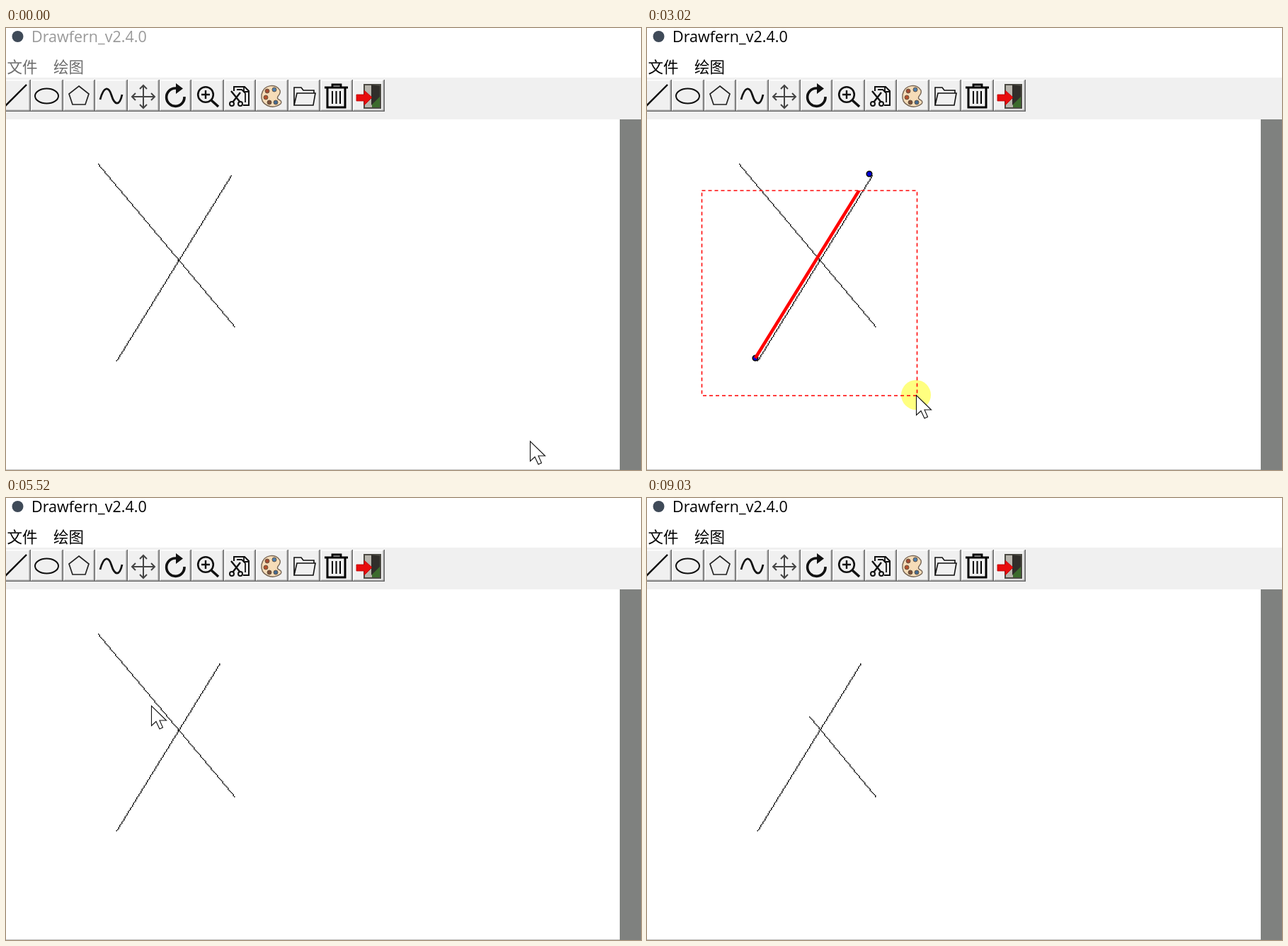
An HTML page with a canvas that plays this animation: 897 px wide and 624 px high, repeating every 9.3 s.

```html
<!DOCTYPE html>
<html lang="zh">
<head>
<meta charset="utf-8">
<title>Drawfern</title>
<style>
html, body { margin: 0; width: 100%; height: 100%; overflow: hidden; background: #fff; }
canvas { display: block; }
</style>
</head>
<body>
<canvas id="stage" width="897" height="624"></canvas>
<script>
const ctx = document.getElementById('stage').getContext('2d');
const LOOP = 9300, STEP = 125.5, TAU = Math.PI * 2;

// Pointer keys: step, x, y
const path = [
  [0, 740, 583], [1, 640, 460], [2, 510, 300], [3, 400, 170], [4, 347, 106],
  [5, 335, 100], [6, 328, 97], [7, 322, 110], [11, 267, 281], [13, 267, 281],
  [14, 245, 272], [17, 76, 228], [18, 120, 270], [22, 389, 500], [23, 390, 519],
  [24, 380, 518], [25, 385, 480], [29, 470, 230], [31, 515, 165], [32, 529, 162],
  [33, 545, 221], [34, 520, 330], [36, 471, 484], [37, 471, 484], [38, 398, 519],
  [39, 398, 524], [40, 392, 522], [44, 205, 293], [46, 205, 277], [47, 205, 277],
  [48, 207, 277], [50, 207, 277], [56, 226, 170], [57, 225, 160], [58, 115, 329],
  [59, 74, 370], [60, 85, 382], [61, 150, 380], [65, 400, 500], [66, 415, 505],
  [69, 441, 476], [71, 749, 587]
];

// Each selected line: ends of its handles, drag corner, and step ranges
const picks = [
  { a: [153, 466], b: [314, 206], corner: [77.5, 229.5], from: 13, drag: 18, end: 40 },
  { a: [126, 189], b: [319, 419], corner: [226.5, 161.5], from: 50, drag: 58, end: 66 }
];

const within = (k, a, b) => k >= a && k < b;
const isDown = k => within(k, 5, 7) || k === 13 || within(k, 17, 40) || k === 50 || within(k, 58, 66);

function pointer(k) {
  const i = path.findIndex(p => p[0] >= k);
  if (i < 0) return null;
  const [k1, x1, y1] = path[i];
  if (!i) return [x1, y1];
  const [k0, x0, y0] = path[i - 1];
  const f = (k - k0) / (k1 - k0);
  return [Math.round(x0 + (x1 - x0) * f), Math.round(y0 + (y1 - y0) * f)];
}

function box(x, y, w, h, color) {
  ctx.fillStyle = color;
  ctx.fillRect(x, y, w, h);
}

function shape(d, stroke, width = 2, fill) {
  const p = new Path2D(d);
  if (fill) { ctx.fillStyle = fill; ctx.fill(p); }
  if (stroke) { ctx.strokeStyle = stroke; ctx.lineWidth = width; ctx.stroke(p); }
}

function disc(x, y, r, fill, stroke, width = 1) {
  ctx.beginPath();
  ctx.arc(x, y, r, 0, TAU);
  if (fill) { ctx.fillStyle = fill; ctx.fill(); }
  if (stroke) { ctx.strokeStyle = stroke; ctx.lineWidth = width; ctx.stroke(); }
}

function label(s, x, y, font, color) {
  ctx.font = font;
  ctx.fillStyle = color;
  ctx.fillText(s, x, y);
}

const icons = [
  () => shape('M-3 112L29 80', '#000', 2.4),
  () => {
    ctx.beginPath();
    ctx.ellipse(57.5, 96, 16.5, 10.5, 0, 0, TAU);
    ctx.strokeStyle = '#111'; ctx.lineWidth = 2; ctx.stroke();
  },
  () => shape('M103 82L117 93L112 108H94L89 93Z', '#222', 1.7),
  () => shape('M133 101C138 82 145 82 149 95S160 112 164 94', '#111', 2.8),
  () => shape('M178 97H210M194 81V113M183 92L178 97L183 102M205 92L210 97L205 102' +
    'M189 86L194 81L199 86M189 108L194 113L199 108', '#444', 2),
  () => {
    shape('M252 97A12.7 12.7 0 1 1 239 85H243', '#111', 3.6);
    shape('M240 78L250 85.5L240 93Z', null, 0, '#111');
  },
  () => {
    disc(282, 94, 10.8, null, '#111', 2.6);
    shape('M276 94H288M282 88V100', '#111', 2.4);
    shape('M290 102L300 111', '#111', 3.6);
  },
  () => {
    shape('M322 89V83H337L343 89V109H335', '#111', 2);
    shape('M326 87H333L338 92V105M336 83V90H343', '#111', 1.8);
    shape('M318 89L331 105M331 91L320 105', '#111', 2.4);
    disc(319, 107, 3, null, '#111', 2);
    disc(331, 107, 3, null, '#111', 2);
  },
  () => {
    shape('M387 88C382 78 364 79 361 94C359 109 376 116 388 107C391 103 386 102 384 100' +
      'C381 96 389 95 387 88Z', '#765', 1.4, '#f6dcb8');
    [[369, 89, '#a54b31'], [379, 87, '#4e7fb0'], [367, 98, '#b5502c'],
     [372, 105, '#7b4f38'], [381, 105, '#456b91']].forEach(([x, y, c]) => disc(x, y, 3, c, '#654', 1));
  },
  () => shape('M407 109V84H417L420 88H435V92M407 109L411 92H437L434 109Z', '#111', 1.6),
  () => {
    shape('M450 84H483M461 83V80H473V83', '#000', 2.8);
    shape('M454 85V112H479V85', '#000', 3);
    shape('M461 89V107M466.5 89V107M472 89V107', '#000', 2);
  },
  () => {
    box(505, 79, 25, 35, '#4b4a43');
    box(507, 81, 10, 31, '#b9b6ae');
    box(517, 95, 11, 17, '#3c6b2c');
    shape('M516 80L528 82V97L516 109Z', null, 0, '#302e2a');
    shape('M495 94H506V88L517 98L506 109V103H495Z', '#b00', 0.8, '#e80d0d');
  }
];

function button(i, pressed) {
  const x = Math.round(-10.3 + 45.45 * i), r = Math.round(-10.3 + 45.45 * (i + 1));
  const w = r - x, light = '#fff', dark = '#777';
  box(x, 73, w, 45, '#f0f0f0');
  box(x, 73, w, 1.5, pressed ? dark : light);
  box(x, 73, 1.5, 45, pressed ? dark : light);
  box(x + 1, 115.5, w - 1, 1.2, pressed ? '#eee' : '#a5a5a5');
  box(r - 2.6, 74, 1.2, 43, pressed ? '#eee' : '#a5a5a5');
  box(x, 116.7, w, 1.3, pressed ? light : '#666');
  box(r - 1.4, 73, 1.4, 45, pressed ? light : '#666');
  ctx.save();
  if (pressed) ctx.translate(1.5, 1.5);
  icons[i]();
  ctx.restore();
}

// Stepped line on a coarse grid
function roughLine(x0, y0, x1, y1) {
  const u = 1.5, n = Math.round(Math.abs(y1 - y0) / u);
  ctx.fillStyle = '#000';
  for (let i = 0; i <= n; i++) {
    const x = x0 + (x1 - x0) * i / n, y = y0 + (y1 - y0) * i / n;
    ctx.fillRect(Math.round(x / u) * u - 0.5, Math.round(y / u) * u - 0.5, u, u);
  }
}

function pick(p, k, tip) {
  if (!within(k, p.from, p.end)) return;
  [p.a, p.b].forEach(([x, y]) => disc(x, y, 3.8, '#0000d8', '#000', 1.5));
  if (k < p.drag) return;
  const [x, y] = p.corner, w = tip[0] + 1.5 - x, h = tip[1] + 1 - y;
  ctx.save();
  ctx.beginPath();
  ctx.rect(x, y, w, h);
  ctx.clip();
  shape(`M${p.a}L${p.b}`, '#f00', 4.5);
  ctx.restore();
  ctx.setLineDash([5, 4]);
  const r = x + w, b = y + h, l = Math.min(x, r), t = Math.min(y, b);
  ctx.strokeStyle = '#f00';
  ctx.lineWidth = 1.5;
  ctx.strokeRect(l, t, Math.abs(w), Math.abs(h));
  ctx.setLineDash([]);
}

function cursor([x, y], down) {
  if (down) {
    ctx.globalCompositeOperation = 'multiply';
    disc(x, y, 21, '#ffff80');
    ctx.globalCompositeOperation = 'source-over';
  }
  ctx.save();
  ctx.translate(x + 0.5, y + 0.5);
  shape('M0 0V28L6.5 22L11.5 32.5L16 30.5L11.5 20.5H21Z', '#111', 1.1, '#fff');
  ctx.restore();
}

function draw(t) {
  const k = Math.floor((t + 12) / STEP), tip = pointer(k), active = k >= 5;
  box(0, 0, 897, 624, '#fff');
  disc(16.5, 12, 8, '#3f4a58');
  label('Drawfern_v2.4.0', 36, 19.5, '21.5px "Open Sans", "Noto Sans", sans-serif', active ? '#000' : '#999');
  const cjk = '300 21.5px "Noto Sans CJK SC", "Noto Sans CJK", sans-serif';
  label('文件', 1.5, 63, cjk, active ? '#000' : '#6d6d6d');
  label('绘图', 67, 63, cjk, active ? '#000' : '#6d6d6d');
  box(0, 70, 897, 59, '#f0f0f0');
  for (let i = 0; i < 12; i++) button(i, i === 7 && within(k, 5, 7));
  box(867, 129, 30, 495, '#7f817f');
  box(0, 623, 867, 1, '#c4c4c4');

  if (k < picks[1].end) roughLine(130, 192.5, 323, 422);
  else roughLine(230, 309.5, 323, 422);
  if (k < picks[0].end) roughLine(318, 208, 156.5, 469);
  else roughLine(302, 233.5, 156.5, 469);

  picks.forEach(p => pick(p, k, tip));
  if (tip) cursor(tip, isDown(k));
}

const start = performance.now();
function frame() {
  draw((performance.now() - start) % LOOP);
  requestAnimationFrame(frame);
}
frame();
</script>
</body>
</html>
```
